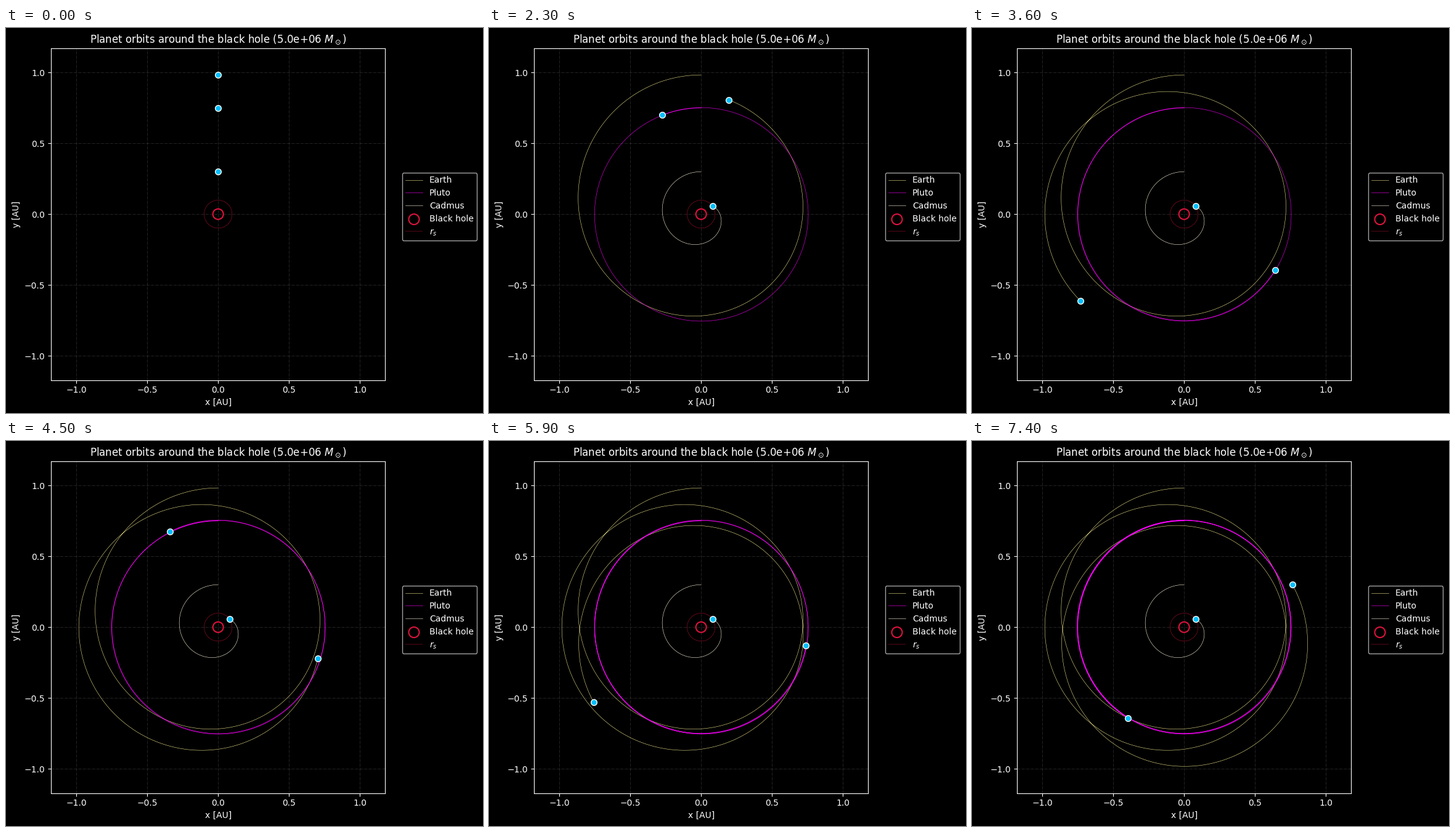
Recreate the animation shown at these times as a matplotlib script. Size 774x625 px, loop 7500 ms.

```python
import numpy as np
import matplotlib.pyplot as plt
from matplotlib.animation import FuncAnimation

W, H, DPI = 774, 625, 100
FRAMES, STEP_MS, SUB = 75, 100, 200
RS = 0.0987                  # Schwarzschild radius in AU
DT = 4 * np.pi / (FRAMES - 1) / SUB   # two Newtonian periods, GM = 1
LEFT, BOTTOM, AX_W, AX_H = 72.94, 53.3, 542.5, 539   # axes box in pixels
X_MAX = 1.18

BODIES = [("Earth", 0.0167, "khaki"),
          ("Pluto", 0.25, "magenta"),
          ("Cadmus", 0.7, "cornsilk")]


def integrate(ecc):
    """Relativistic orbits with a = 1, started at r = 1 - e."""
    r0 = 1 - ecc
    h2 = 1 - ecc ** 2
    n = len(ecc)
    state = np.zeros((n, 4))
    state[:, 1] = r0
    state[:, 2] = -np.sqrt(h2) / r0

    def deriv(s):
        r2 = s[:, 0] ** 2 + s[:, 1] ** 2
        pull = -(1 + 1.5 * RS * h2 / r2) / r2 ** 1.5
        out = np.empty_like(s)
        out[:, :2] = s[:, 2:]
        out[:, 2:] = s[:, :2] * pull[:, None]
        return out

    path = np.empty(((FRAMES - 1) * SUB + 1, n, 2))
    path[0] = state[:, :2]
    alive = np.ones((n, 1), bool)
    for i in range(1, len(path)):
        k1 = deriv(state)
        k2 = deriv(state + DT / 2 * k1)
        k3 = deriv(state + DT / 2 * k2)
        k4 = deriv(state + DT * k3)
        new = state + DT / 6 * (k1 + 2 * k2 + 2 * k3 + k4)
        alive &= np.hypot(new[:, 0], new[:, 1])[:, None] > RS
        state = np.where(alive, new, state)
        path[i] = state[:, :2]
    return path


orbits = integrate(np.array([e for _, e, _ in BODIES]))

plt.style.use("dark_background")
fig = plt.figure(figsize=(W / DPI, H / DPI), dpi=DPI)
ax = fig.add_axes([LEFT / W, BOTTOM / H, AX_W / W, AX_H / H])
y_max = X_MAX * AX_H / AX_W
ax.set_xlim(-X_MAX, X_MAX)
ax.set_ylim(-y_max, y_max)
ticks = np.arange(-1, 1.1, 0.5)
ax.set_xticks(ticks)
ax.set_yticks(ticks)
ax.set_axisbelow(True)
ax.grid(ls="-.", lw=0.5, color="gray", alpha=0.4)
ax.set_xlabel("x [AU]")
ax.set_ylabel("y [AU]")
ax.set_title(r"Planet orbits around the black hole (5.0e+06 $M_\odot$)")

trails = [ax.plot([], [], lw=0.4, color=c, label=name)[0]
          for name, _, c in BODIES]
ax.scatter(0, 0, s=150, facecolors="none", edgecolors="crimson",
           linewidths=1.5, label="Black hole")
phi = np.linspace(0, 2 * np.pi, 300)
ax.plot(RS * np.cos(phi), RS * np.sin(phi), lw=0.3, color="crimson",
        label="$r_s$")
dots, = ax.plot([], [], "o", ms=7, mfc="deepskyblue", mec="white", mew=1,
                zorder=3)
ax.legend(loc="upper left", bbox_to_anchor=(1.05, 0.625), borderaxespad=0)


def update(frame):
    end = frame * SUB
    for k, line in enumerate(trails):
        line.set_data(orbits[:end + 1, k].T)
    dots.set_data(orbits[end].T)
    return [*trails, dots]


anim = FuncAnimation(fig, update, frames=FRAMES, interval=STEP_MS,
                     repeat=True, repeat_delay=0)
plt.show()
```
